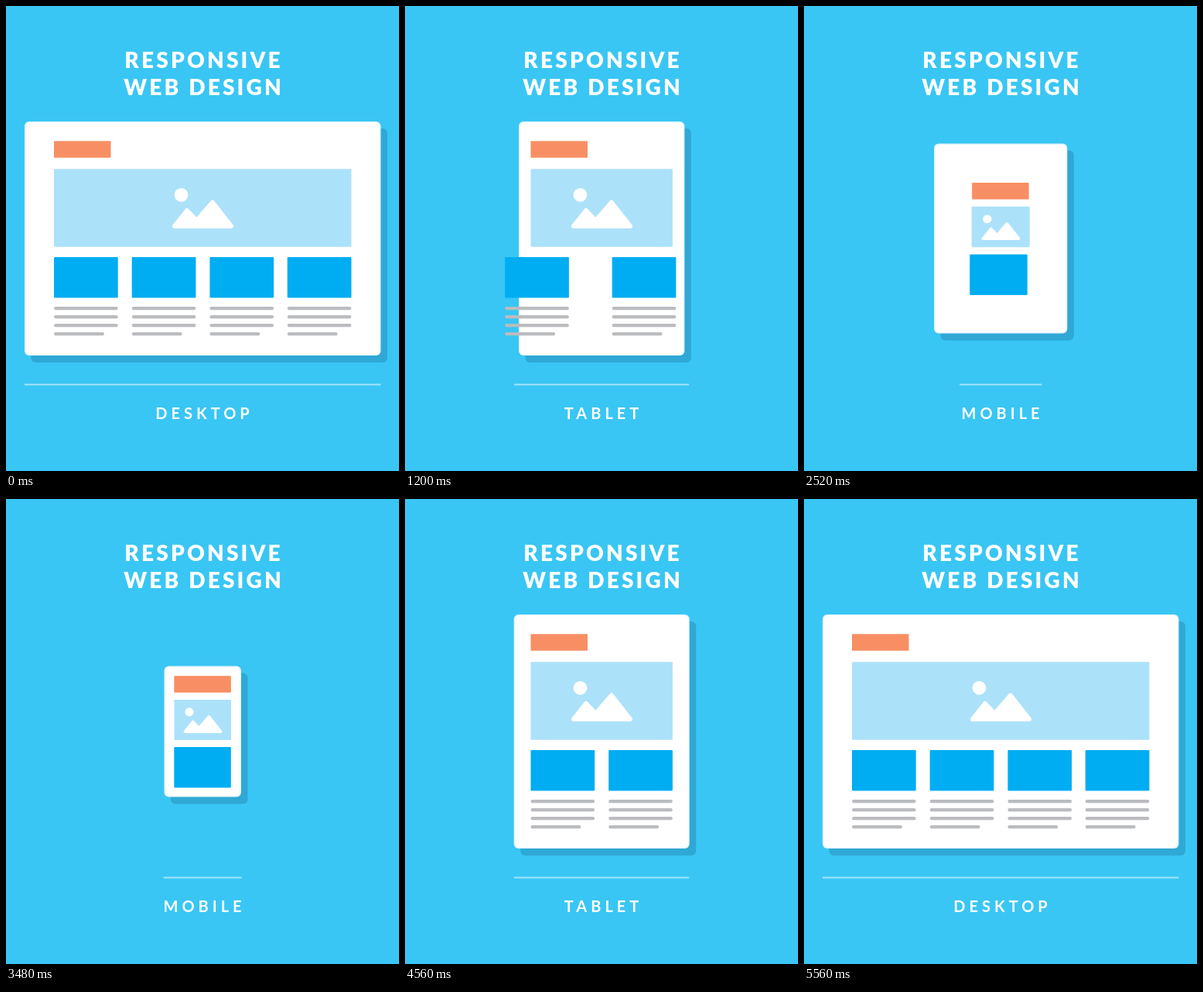
These frames come from a looping animation (508 by 600 pixels, 5640 ms). An HTML page with a canvas:

```html
<!DOCTYPE html>
<html lang="en">
<head>
<meta charset="utf-8">
<title>Responsive web design</title>
<style>
  html, body { margin: 0; width: 100%; height: 100%; overflow: hidden; background: #39c6f4; }
  canvas { display: block; }
</style>
</head>
<body>
<canvas id="stage" width="508" height="600"></canvas>
<script>
const ctx = document.getElementById('stage').getContext('2d');
const LOOP = 5640, STEP = 40, CENTER = 254;
const COLORS = {
  sky: '#39c6f4', shadow: '#2fa8d5', edge: '#e6f5fc', rule: '#a5e4fa',
  logo: '#f88f64', hero: '#ace1fa', card: '#00adf2', text: '#babcbf'
};

// Easing
const linear = p => p;
const inOut = p => p < .5 ? 2 * p * p : 1 - 2 * (1 - p) ** 2;
const outBack = p => 1 + 2.7 * (p - 1) ** 3 + 1.7 * (p - 1) ** 2;
const inOutBack = p => {
  const half = x => x * x * (3.6 * x - 2.6) / 2;
  return p < .5 ? half(2 * p) : 1 - half(2 - 2 * p);
};

// Moves are [start, duration, value, easing], in order of time.
const track = (first, ...moves) => t => {
  let value = first;
  for (const [start, duration, next, ease = inOut] of moves) {
    const p = Math.min(1, Math.max(0, (t - start) / duration));
    value += (next - value) * ease(p);
  }
  return value;
};

const deviceTrack = (desktop, tablet, mobile) => track(desktop,
  [920, 360, tablet, outBack], [2485, 330, mobile, outBack],
  [3790, 360, tablet, outBack], [5093, 360, desktop, outBack]);

const heroTrack = (desktop, tablet, mobile) => track(desktop,
  [900, 280, tablet], [2300, 240, mobile], [3710, 240, tablet], [5100, 280, desktop]);

const mobileTrack = (leave, back, duration, wide, mobile) => track(wide,
  [leave, duration, mobile], [back, duration, wide]);

const scene = {
  deviceW: deviceTrack(460.5, 227, 99.5),
  deviceH: deviceTrack(302, 302, 169),
  rule: track(460.5, [840, 265, 226], [2280, 280, 101], [3680, 440, 226], [5048, 280, 460.5]),
  logoX: track(62, [860, 280, 162.5], [2240, 290, 217.3], [3830, 290, 162.5], [5160, 280, 62]),
  logoY: mobileTrack(2240, 3830, 290, 174.3, 228.2),
  heroW: heroTrack(384.5, 183.3, 73.5),
  heroH: heroTrack(100.5, 100.5, 52),
  heroY: mobileTrack(2220, 3880, 290, 260.5, 285),
  icon: mobileTrack(2220, 3880, 290, 1, .63),
  leftX: track(62, [1040, 300, 162.5, inOutBack], [2320, 240, 217.3],
    [3710, 260, 162.5], [5088, 300, 62, inOutBack]),
  leftY: mobileTrack(2320, 3710, 260, 324, 320),
  leftW: mobileTrack(2320, 3710, 260, 82.7, 73.5),
  leftLines: track(4, [2200, 160, 0, linear], [3960, 200, 4, linear]),
  rightX: track(162.7, [1000, 300, 263.2, inOutBack], [5160, 300, 162.7, inOutBack]),
  rightScale: mobileTrack(2240, 3760, 210, 1, 0),
  extraScale: track(1, [840, 250, 0], [5300, 260, 1])
};

function box(x, y, w, h, radius, color) {
  ctx.fillStyle = color;
  ctx.beginPath();
  ctx.roundRect(x, y, w, h, radius);
  ctx.fill();
}

function label(text, y, font, spacing) {
  ctx.font = font;
  ctx.letterSpacing = spacing + 'px';
  ctx.fillStyle = '#fff';
  ctx.textAlign = 'center';
  ctx.fillText(text, CENTER + spacing / 2, y);
}

function card(x, y, w, lines) {
  box(x, y, w, 52.5, 1, COLORS.card);
  for (let i = 0; i < lines; i++) {
    box(x, 387.9 + 11 * i, i === 3 ? w * .785 : w, 4.4, 2.2, COLORS.text);
  }
}

function scaledX(center, scale, draw) {
  if (scale <= 0) return;
  ctx.save();
  ctx.translate(center, 0);
  ctx.scale(scale, 1);
  ctx.translate(-center, 0);
  draw();
  ctx.restore();
}

function device(w, h) {
  const x = CENTER + .2 - w / 2, y = 300 - h / 2;
  box(x + 8.5, y + 9, w, h, 6, COLORS.shadow);
  box(x, y, w, h, 6, COLORS.edge);
  box(x + 1.5, y + 1.5, w - 3, h - 3, 5, '#fff');
}

function pictureIcon(y, scale) {
  ctx.save();
  ctx.translate(CENTER + .5, y);
  ctx.scale(scale, scale);
  ctx.fillStyle = ctx.strokeStyle = '#fff';
  ctx.lineWidth = 6;
  ctx.lineJoin = 'round';
  ctx.beginPath();
  ctx.arc(-28, -17.7, 8.9, 0, 7);
  ctx.fill();
  ctx.beginPath();
  [[-36.5, 22.5], [-20.5, 2.5], [-8, 15.5], [12.5, -8], [36.5, 22.5]].forEach(p => ctx.lineTo(...p));
  ctx.closePath();
  ctx.fill();
  ctx.stroke();
  ctx.restore();
}

function render(t) {
  const s = {};
  for (const name in scene) s[name] = scene[name](t);

  ctx.fillStyle = COLORS.sky;
  ctx.fillRect(0, 0, 508, 600);
  label('RESPONSIVE', 79.5, '900 28px Lato, sans-serif', 3.2);
  label('WEB DESIGN', 115, '900 28px Lato, sans-serif', 3.2);

  device(s.deviceW, s.deviceH);
  box(s.logoX, s.logoY, 73.5, 21.5, 1, COLORS.logo);
  box(CENTER + .2 - s.heroW / 2, s.heroY - s.heroH / 2, s.heroW, s.heroH, 1, COLORS.hero);
  pictureIcon(s.heroY + 1, s.icon);

  scaledX(354.9, s.extraScale, () => {
    card(263.4, 324, 82.7, 4);
    card(363.7, 324, 82.7, 4);
  });
  scaledX(s.rightX + 41.3, s.rightScale, () => card(s.rightX, 324, 82.7, 4));
  card(s.leftX, s.leftY, s.leftW, Math.round(s.leftLines));

  box(CENTER + .2 - s.rule / 2, 487.5, s.rule, 2, 0, COLORS.rule);
  const name = s.rule > 343 ? 'DESKTOP' : s.rule > 163 ? 'TABLET' : 'MOBILE';
  label(name, 533.3, '700 20px Lato, sans-serif', 5);
}

const begin = performance.now();
function tick() {
  const t = (performance.now() - begin) % LOOP;
  render(Math.floor(t / STEP) * STEP);
  requestAnimationFrame(tick);
}
tick();
</script>
</body>
</html>
```
